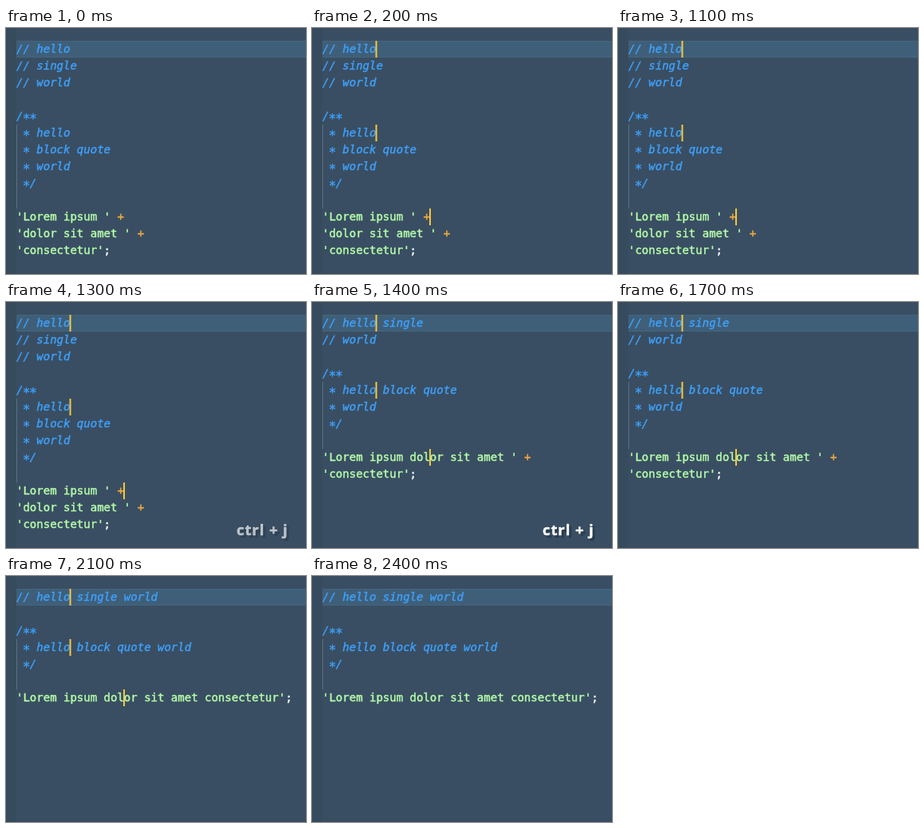
Write an HTML page with a canvas that moves like this. It is 376x308 px and loops after 2.5 s.

```html
<!DOCTYPE html>
<html lang="en">
<head>
<meta charset="utf-8">
<title>Join lines</title>
<style>
html, body { margin: 0; width: 100%; height: 100%; overflow: hidden; background: #394e62; }
canvas { display: block; width: 376px; height: 308px; }
</style>
</head>
<body>
<canvas id="stage"></canvas>
<script>
const W = 376, H = 308, LOOP = 2500, STEP = 100;
const LEFT = 13, TOP = 16, ROW = 21, COL = 8.43;
const MONO = '"DejaVu Sans Mono", monospace';
const KEY_FONT = 'bold 18.5px "Noto Sans", "Open Sans", sans-serif';
const COLOR = {
  bg: '#394e62', gutter: '#374b5e', line: '#3f5f79', edge: '#45657e', guide: '#5c7082',
  comment: '#3f9ff8', string: '#b6fcaa', operator: '#f2aa3c', plain: '#f0f6fa',
  caret: '#f8c83c', key: '#ffffff', shadow: '#2a3d4e'
};

// Each state: lines of text, the rows covered by the indent guide, carets as [row, column].
const STATES = [
  {
    from: 0,
    lines: ['// hello', '// single', '// world', '', '/**', ' * hello', ' * block quote',
      ' * world', ' */', '', "'Lorem ipsum ' +", "'dolor sit amet ' +", "'consectetur';"],
    guide: [5, 10],
    carets: [[0, 8], [5, 8], [10, 16]]
  },
  {
    from: 1400,
    lines: ['// hello single', '// world', '', '/**', ' * hello block quote', ' * world',
      ' */', '', "'Lorem ipsum dolor sit amet ' +", "'consectetur';"],
    guide: [4, 8],
    carets: [[0, 8], [4, 8], [8, 16]]
  },
  {
    from: 1800,
    lines: ['// hello single world', '', '/**', ' * hello block quote world', ' */', '',
      "'Lorem ipsum dolor sit amet consectetur';"],
    guide: [3, 6],
    carets: [[0, 8], [3, 8], [6, 16]]
  }
];

const canvas = document.getElementById('stage');
const ctx = canvas.getContext('2d');
const ratio = window.devicePixelRatio || 1;
canvas.width = W * ratio;
canvas.height = H * ratio;
ctx.scale(ratio, ratio);
ctx.lineJoin = 'round';

const rowTop = row => TOP + row * ROW;

function box(color, x, y, w, h) {
  ctx.fillStyle = color;
  ctx.fillRect(x, y, w, h);
}

// A thin outline gives the text its heavier weight.
function heavyText(text, x, y, color, weight) {
  ctx.fillStyle = ctx.strokeStyle = color;
  ctx.lineWidth = weight;
  ctx.fillText(text, x, y);
  ctx.strokeText(text, x, y);
}

function run(text, col, row, color, style = '') {
  // Asterisks are larger and sit at mid height
  for (const part of text.split(/(\*)/)) {
    const star = part === '*';
    ctx.font = `${style} ${star ? 16 : 14}px ${MONO}`;
    const x = LEFT + col * COL - (star ? 0.6 : 0);
    const y = rowTop(row) + (star ? 19 : 15);
    heavyText(part, x, y, color, 0.45);
    col += part.length;
  }
}

function drawLine(text, row) {
  if (text[0] !== "'") {
    run(text, 0, row, COLOR.comment, 'italic');
    return;
  }
  const end = text.lastIndexOf("'") + 1;
  const tail = text.slice(end);
  run(text.slice(0, end), 0, row, COLOR.string);
  run(tail, end, row, tail === ';' ? COLOR.plain : COLOR.operator);
}

function caretOn(t) {
  return (t >= 100 && t < 500) || (t >= 1000 && t < 2300);
}

function keyAlpha(t) {
  if (t < 1300) return 0;
  if (t < 1400) return 0.65;
  const age = t < 1800 ? t - 1400 : t - 1800;
  return Math.max(0, 1 - age / 300);
}

function drawKey(alpha) {
  if (!alpha) return;
  ctx.save();
  ctx.globalAlpha = alpha;
  ctx.font = KEY_FONT;
  ctx.letterSpacing = '0.9px';
  heavyText('ctrl + j', 292, 295, COLOR.shadow, 0.4);
  heavyText('ctrl + j', 289, 292, COLOR.key, 0.4);
  ctx.restore();
}

function draw(t) {
  const state = STATES.filter(s => t >= s.from).pop();
  box(COLOR.bg, 0, 0, W, H);
  box(COLOR.gutter, 0, 0, LEFT, H);
  box(COLOR.edge, LEFT, TOP, W - LEFT, ROW);
  box(COLOR.line, LEFT, TOP + 1, W - LEFT, ROW - 2);

  const [first, last] = state.guide;
  box(COLOR.guide, LEFT, rowTop(first), 1, (last - first) * ROW);
  state.lines.forEach(drawLine);

  if (caretOn(t)) {
    for (const [row, col] of state.carets) {
      box(COLOR.caret, LEFT + col * COL - 0.9, rowTop(row), 2, ROW);
    }
  }
  drawKey(keyAlpha(t));
}

const start = performance.now();
function tick() {
  const t = (performance.now() - start) % LOOP;
  draw(Math.floor(t / STEP) * STEP);
  requestAnimationFrame(tick);
}
tick();
</script>
</body>
</html>
```
